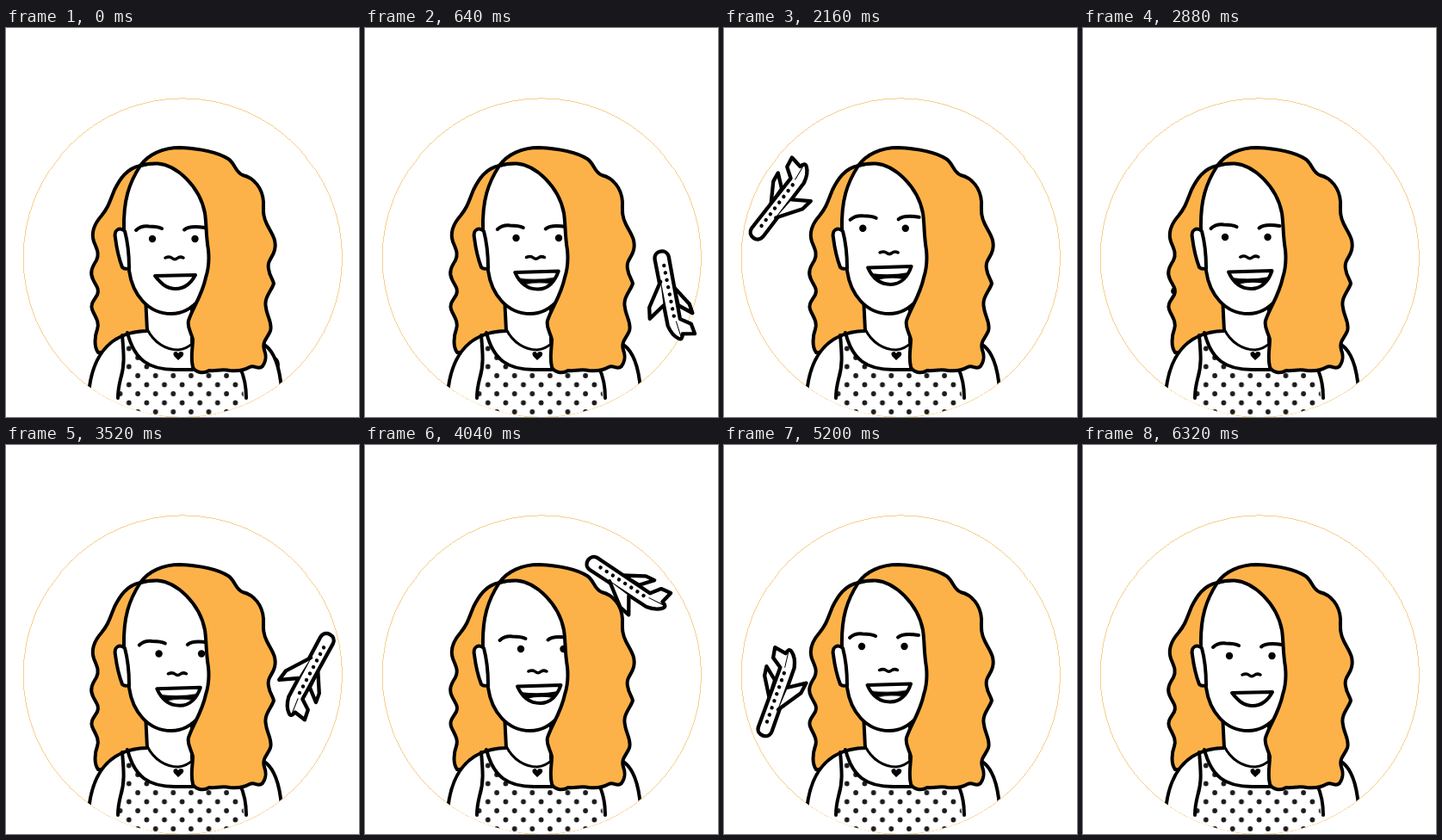
Recreate the animation shown at these times as an HTML page without scripts. Size 410 px wide and 452 px high, loop 6.8 s.

```html
<!DOCTYPE html>
<html lang="en">
<head>
<meta charset="utf-8">
<title>Plane around the head</title>
<style>
  @property --gx { syntax: "<number>"; inherits: true; initial-value: 0; }
  @property --gy { syntax: "<number>"; inherits: true; initial-value: 0; }

  html, body { margin: 0; width: 100%; height: 100%; overflow: hidden; background: #fff; }
  svg { display: block; width: 410px; height: 452px; }

  .ink { fill: #fff; stroke: #000; stroke-width: 4; stroke-linecap: round; stroke-linejoin: round; }
  .line { fill: none; }
  .hair { fill: #fcb249; }
  .solid { fill: #000; stroke: none; }
  .ring { fill: none; stroke: #f0b040; stroke-width: .6; shape-rendering: crispEdges; }

  /* The face looks after the plane; lower features follow less. */
  .face { animation: gaze 6.8s linear infinite; }
  .face > * { transform: translate(calc(var(--gx) * var(--kx) * 1px), calc(var(--gy) * var(--ky) * 1px)); }
  .eyes { --kx: 1; --ky: 1; }
  .brows { --kx: .5; --ky: 1; }
  .nose { --kx: .45; --ky: .5; stroke-width: 3.5; }
  .mouth { --kx: .5; --ky: .5; }
  .lips { animation: smile 6.8s linear infinite; }
  .gap { animation: gap 6.8s linear infinite; }

  .plane {
    offset-path: path("M266 376 C339 403 366 370 353 308.5 C350 295 343 280 336 268 C311 225 251 189 192 180 C127 170 69 172 55 224 C39 282 85 318 155 298 C195 294 230 300 270 300 C350 300 375 256 345 203 C334 184 318 172 301 161 C275 145 242 158 207 165 C132 176 85 223 62 289 C45 339 80 385 145 366 L200 360");
    offset-rotate: auto 180deg;
    animation: fly 6.8s linear infinite, behind 6.8s step-end infinite;
  }
  .plane.front { animation-name: fly, ahead; }
  .jet { stroke-width: 4.3; }
  .windows { stroke-width: 4.4; stroke-dasharray: 0 8.53; }
  .seam { stroke-width: 1; }

  @keyframes fly {
    0%, 2.35% { offset-distance: 0%; }
    9.41% { offset-distance: 9.7%; }
    12.35% { offset-distance: 12.6%; }
    22.35% { offset-distance: 24.1%; }
    33.53% { offset-distance: 34.7%; }
    42.35% { offset-distance: 45.1%; }
    54.71% { offset-distance: 63%; }
    59.41% { offset-distance: 67%; }
    65.29% { offset-distance: 73.5%; }
    76.47% { offset-distance: 86.7%; }
    86.47% { offset-distance: 96.4%; }
    92.94%, 100% { offset-distance: 100%; }
  }
  @keyframes ahead {
    0%, 33.5%, 76.5%, 100% { visibility: hidden; }
    11.2%, 54.7% { visibility: visible; }
  }
  @keyframes behind {
    0%, 33.5%, 76.5%, 100% { visibility: visible; }
    11.2%, 54.7% { visibility: hidden; }
  }
  @keyframes gaze {
    0%, 2.35% { --gx: 0; --gy: 0; }
    9.41% { --gx: 5.5; --gy: -1; }
    12.35% { --gx: 9; --gy: -4; }
    17% { --gx: 8; --gy: -12; }
    22.35% { --gx: 3; --gy: -18; }
    28% { --gx: -6; --gy: -17; }
    33.5% { --gx: -10; --gy: -10; }
    42.35% { --gx: -5; --gy: -2; }
    47% { --gx: 2; --gy: 0; }
    54.7% { --gx: 11; --gy: -4; }
    59.41% { --gx: 11; --gy: -8; }
    65.3% { --gx: 5; --gy: -15; }
    70% { --gx: -3; --gy: -17; }
    76.47% { --gx: -10; --gy: -11; }
    86.47% { --gx: -4; --gy: -3; }
    92.94%, 100% { --gx: 0; --gy: 0; }
  }
  @keyframes smile {
    0%, 2.35%, 92.94%, 100% { d: path("M173 288 L220 287 C214 298 206 303 197 303 C187 303 181 298 173 288Z"); }
    7%, 87% { d: path("M171.5 284.5 L222 283 C218 295 210 304 198 304 C186 304 177 297 171.5 284.5Z"); }
  }
  @keyframes gap {
    0%, 3.5%, 91.5%, 100% { opacity: 0; }
    7%, 87% { opacity: 1; }
  }
</style>
</head>
<body>
<svg viewBox="0 0 410 452">
  <defs>
    <clipPath id="disc"><circle cx="205" cy="267" r="185"/></clipPath>
    <pattern id="dots" x="132.5" y="404" width="20.6" height="21" patternUnits="userSpaceOnUse">
      <g fill="#1c1c1c">
        <circle cx="10.3" cy="10.5" r="2.9"/>
        <circle r="2.9"/><circle cx="20.6" r="2.9"/>
        <circle cy="21" r="2.9"/><circle cx="20.6" cy="21" r="2.9"/>
      </g>
    </pattern>
    <g id="jet" class="ink jet">
      <path d="M-9 -7 L14 -21 L25 -22.5 L13 -8Z"/>
      <path d="M-44.5 -8 L29 -7 L37 -18.5 L49 -20.5 L46.500 -6.500 Q54 -5 51 -1 Q46 6 34 8.500 L-44.5 8.500 C-55 8 -55 -7.500 -44.5 -8Z"/>
      <path d="M-18 7 L9 25.500 L22 27.500 L10 9"/>
      <path class="line windows" d="M-35.5 -.6 H25"/>
      <path class="line seam" d="M31 -2 L49 -4"/>
    </g>
  </defs>

  <circle class="ring" cx="205.300" cy="267" r="185.200"/>
  <use href="#jet" class="plane back"/>

  <path class="ink hair" d="M156 160 C140 163 132 176 126 188 C120 203 119 208 111 218 C104 226 98 236 102 248 C105 256 109 262 105 270 C100 278 97 284 101 292 C104 299 109 303 106 310 C102 317 98 320 100 327 C103 335 109 341 106 350 C103 358 102 370 107 377 L170 377 V200Z"/>

  <g class="ink" clip-path="url(#disc)">
    <path d="M94 460 L96 425 C99 390 114 353 164 352 L162 312 H216 V365 L300 368 C312 376 318 395 320 420 V460Z"/>
    <path fill="url(#dots)" stroke="none" style="stroke:none" d="M135 357 C137 380 138 392 133 408 L130 460 H280 L272 395 L240 397 H200 C165 398 149 385 141 354Z"/>
    <path class="line" d="M130 430 Q130 420 133 408 C138 392 137 380 135 357 M141 354 C149 385 165 398 200 397 H240 L272 395 Q279 410 279 430"/>
    <path class="line" d="M164 350 C172 366 186 374 200 374 Q210 373 217 366" style="stroke-width:3"/>
    <path class="solid" d="M200 386 L195 381 Q193 376 198 376 L200 378 L202 376 Q208 376 205.500 381Z"/>
  </g>

  <g class="ink">
    <path d="M156 160 C143 180 136 200 137 235 L143 282 C147 310 165 332 192 332 C216 332 236 310 245 270 L236 205 C232 170 205 148 156 160Z"/>
    <path d="M138 236 C132 231 125 234 127 244 C129 260 132 270 135 278 Q138 281 143 279 Q143 255 138 236Z"/>
  </g>

  <g class="face ink">
    <g class="brows line">
      <path d="M151 235 Q157 229.500 166 230.500 Q176 230.500 181 233"/>
      <path d="M207 234.500 Q213 229 231 232"/>
    </g>
    <g class="eyes solid">
      <circle cx="170" cy="245" r="4.200"/>
      <circle cx="219.500" cy="245" r="4.200"/>
    </g>
    <path class="nose line" d="M185 267 Q190 265 193 267.500 Q196 270 199 267.500 Q202 265 206 267"/>
    <g class="mouth">
      <path class="lips" d="M173 288 L220 287 C214 298 206 303 197 303 C187 303 181 298 173 288Z"/>
      <path class="gap solid" d="M175 291 Q197 294 219 290 L213 298 Q197 295 182 299Z"/>
    </g>
  </g>

  <path class="ink hair" d="M156 160 C165 147 182 139 202 139 C225 140 245 144 258 152 C266 157 266 167 275 171 C288 174 298 186 299 202 C299 212 298 218 303 228 C308 238 315 246 312 258 C310 267 303 270 305 280 C306 288 310 292 311 297 C308 306 299 314 302 325 C303 335 310 343 307 352 C304 360 297 364 300 374 C303 382 302 387 298 393 C293 398 289 391 283 394 C276 398 268 399 260 398 C250 396 244 399 236 398 C228 403 219 399 217 394 C214 382 217 372 217 362 C215 353 210 348 212 340 C217 325 228 310 232 290 C236 278 236 268 235 258 C232 240 233 228 231 215 C225 184 198 159 176 157.500 Q164 157 156 160Z"/>

  <use href="#jet" class="plane front"/>
</svg>
</body>
</html>
```
